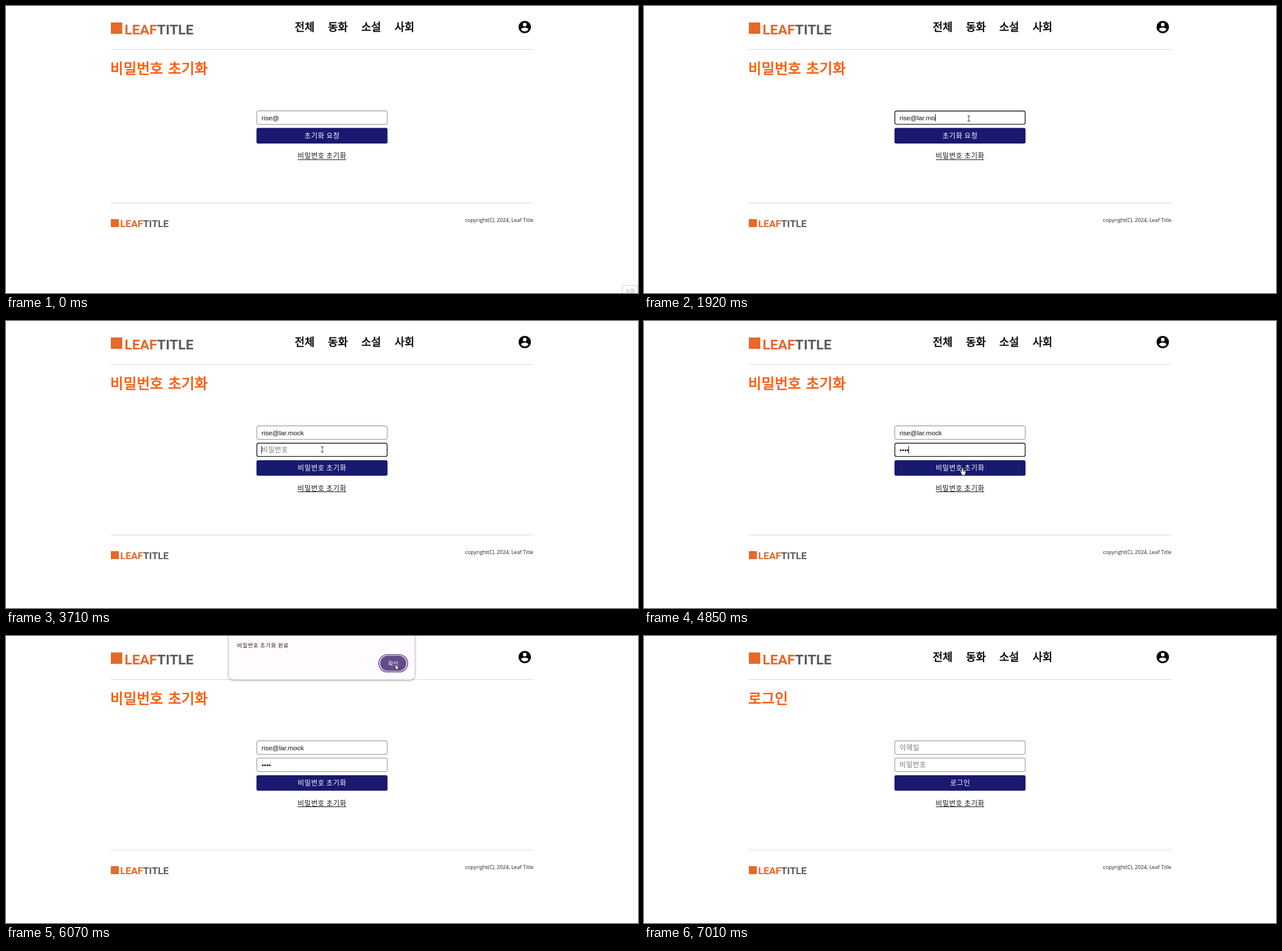
An HTML page with a canvas for the animation above (7.37 s loop, 1109x505 px).

```html
<!DOCTYPE html>
<html lang="ko">
<head>
<meta charset="utf-8">
<title>Leaf Title</title>
<style>
html, body { margin: 0; width: 100%; height: 100%; overflow: hidden; background: #fff; }
canvas { display: block; }
</style>
</head>
<body>
<canvas id="stage" width="1109" height="505"></canvas>
<script>
const ctx = document.getElementById('stage').getContext('2d');
const LOOP = 7370;
const KR = '"Noto Sans CJK KR", "Noto Sans CJK", sans-serif';
const ARIAL = '"Liberation Sans", sans-serif';
const ORANGE = '#e8682a', NAVY = '#191970', PURPLE = '#654b89';
const LEFT = 183.5, RIGHT = 925.5, FORM = 439.5, FORM_W = 230;
const EMAIL = 'rise@lar.mock';
const RESET = '비밀번호 초기화';

// Moments of the story, in ms
const FOCUS_EMAIL = 960, REQUESTED = 3160, FOCUS_PASS = 3710;
const ALERT = 5070, CLOSE = 6110, LOGIN = 6150, FADE = 180;
const DOT_TIMES = [4040, 4300, 4460, 4580];

// Pointer path: time, x, y
const PATH = [
  [60, 1062, 520], [400, 800, 360], [750, 563, 222], [900, 570, 198],
  [2620, 570, 198], [2940, 555, 226], [4600, 555, 226], [4820, 559, 258],
  [5150, 559, 258], [5490, 575, 234], [5760, 676, 47], [6110, 684, 50],
  [6260, 714.5, 80], [6560, 972, 386], [6700, 1025, 450], [7000, 1056, 510]
];

const HAND = new Path2D('M-1.3 1V7L-2.4 6Q-4 5.3-4.1 6.8L-1.8 11V13.2H4.5V11.4Q6 9 5.8 5.5Q5.4 4.1 4.3 4.7Q3.9 3.7 2.8 4.2Q2.3 3.4 1.3 3.8V1Q0-.8-1.3 1Z');
const ARROW = new Path2D('M0 0V10L2.3 7.9L3.8 11.3L5.4 10.6L3.9 7.3H7Z');
const SHOULDERS = new Path2D('M12 19.2c-2.5 0-4.71-1.28-6-3.22 .03-1.99 4-3.08 6-3.08 1.99 0 5.97 1.09 6 3.08-1.29 1.94-3.5 3.22-6 3.22z');
const DIALOG = new Path2D();
DIALOG.roundRect(391, -20, 326, 96.5, 8);
const AROUND_DIALOG = new Path2D(DIALOG);
AROUND_DIALOG.rect(371, -40, 366, 140);

const clamp = v => Math.max(0, Math.min(1, v));

function text(str, x, midY, size, { color = '#111', font = KR, weight = 400, align = 'left', spacing = 0, semibold = false } = {}) {
  ctx.font = `${weight} ${size}px ${font}`;
  ctx.letterSpacing = spacing + 'px';
  ctx.textAlign = align;
  ctx.fillStyle = color;
  const baseline = midY + size * 0.37;
  ctx.fillText(str, x, baseline);
  if (semibold) {
    ctx.strokeStyle = color;
    ctx.lineWidth = size * 0.035;
    ctx.strokeText(str, x, baseline);
  }
  return ctx.measureText(str).width;
}

function box(x, y, w, h, r, fill, stroke, line = 1) {
  ctx.beginPath();
  ctx.roundRect(x, y, w, h, r);
  if (fill) { ctx.fillStyle = fill; ctx.fill(); }
  if (stroke) { ctx.strokeStyle = stroke; ctx.lineWidth = line; ctx.stroke(); }
}

function disc(x, y, r, color) {
  ctx.fillStyle = color;
  ctx.beginPath();
  ctx.arc(x, y, r, 0, Math.PI * 2);
  ctx.fill();
}

function rule(y) {
  ctx.fillStyle = '#d9d9d9';
  ctx.fillRect(LEFT, y, RIGHT - LEFT, 1);
}

function brand(markY, markSize, textX, midY, size) {
  const style = { font: 'Roboto, sans-serif', weight: 700 };
  ctx.fillStyle = ORANGE;
  ctx.fillRect(184, markY, markSize, markSize);
  const w = text('LEAF', textX, midY, size, { ...style, color: ORANGE });
  text('TITLE', textX + w, midY, size, { ...style, color: '#5c5c5c' });
}

function header(title) {
  brand(29, 20, 208, 40.5, 24.5);
  ['전체', '동화', '소설', '사회'].forEach((label, i) =>
    text(label, 506.7 + i * 58.4, 37.5, 18.8, { semibold: true, color: '#000' }));
  disc(910.3, 37, 10.8, '#000');
  disc(910.3, 32.7, 3.2, '#fff');
  ctx.save();
  ctx.translate(897.3, 24);
  ctx.scale(1.08, 1.08);
  ctx.fill(SHOULDERS);
  ctx.restore();
  rule(76);
  ctx.wordSpacing = '3px';
  text(title, 183, 109.5, 25, { semibold: true, color: '#ff5a0a', spacing: 0.2 });
  ctx.wordSpacing = '0px';
}

function field(y, value, hint, focused, caret) {
  if (focused) box(FORM + 0.7, y + 0.7, FORM_W - 1.4, 23.4, 3, '#fff', '#1a1a1a', 1.4);
  else box(FORM + 0.5, y + 0.5, FORM_W - 1, 23.8, 3, '#fff', '#858585');
  const midY = y + 12.6;
  let w = 0;
  if (value) w = text(value, 448.5, midY, 11.7, { font: ARIAL });
  else text(hint, 448.5, midY - 0.3, 12, { color: '#757575', spacing: 0.6 });
  if (caret) {
    ctx.fillStyle = '#111';
    ctx.fillRect(Math.round(448 + w), y + 6, 1, 13);
  }
}

function emailAt(t) {
  if (t < 1200) return EMAIL.slice(0, 5);
  const extra = t < 1400 ? 0 : Math.min(7, 1 + Math.floor((t - 1400) / 120));
  return EMAIL.slice(0, 6 + extra);
}

function form(t, stage) {
  const shift = stage ? 30.3 : 0;
  const login = stage === 2;
  const emailFocus = t >= FOCUS_EMAIL && t < REQUESTED;
  field(184, login ? '' : emailAt(t), '이메일', emailFocus, emailFocus && (t < 2620 || t >= 3120));
  if (stage) {
    const focus = t >= FOCUS_PASS && t < ALERT;
    const dots = login ? 0 : DOT_TIMES.filter(d => t >= d).length;
    field(214.3, '•'.repeat(dots), '비밀번호', focus, focus);
  }
  box(FORM, 214.6 + shift, FORM_W, 27.4, 3, NAVY);
  const center = { align: 'center', spacing: 0.7 };
  text(['초기화 요청', RESET, '로그인'][stage], 554.8, 228.7 + shift, 12, { ...center, color: '#fff' });
  text(RESET, 554.8, 264 + shift, 12, center);
  ctx.fillStyle = '#111';
  ctx.fillRect(512, Math.round(270 + shift), 85, 1);
}

function footer(stage) {
  const dy = stage ? 30 : 0;
  rule(346 + dy);
  brand(375 + dy, 14, 200.5, 382.5 + dy, 17.2);
  text('copyright(C), 2024, Leaf Title', RIGHT, 376.5 + dy, 9.2,
    { font: '"Open Sans", sans-serif', color: '#222', align: 'right' });
}

function dialog(t) {
  if (t < ALERT || t > CLOSE + FADE) return;
  const leaving = clamp((t - CLOSE) / FADE);
  const closing = t >= CLOSE;
  const entering = clamp((t - ALERT) / 120);
  ctx.save();
  ctx.globalAlpha = closing ? 1 - leaving : entering;
  ctx.translate(0, closing ? -13 * leaving : -12 * (1 - entering));
  ctx.fillStyle = '#fffbff';
  // Keep the shadow outside so it does not darken the fading panel
  ctx.save();
  ctx.clip(AROUND_DIALOG, 'evenodd');
  ctx.shadowColor = 'rgba(0,0,0,.45)';
  ctx.shadowBlur = 4;
  ctx.shadowOffsetY = 1;
  ctx.fill(DIALOG);
  ctx.restore();
  ctx.fill(DIALOG);
  text(RESET + ' 완료', 405.5, 16, 9.5, { color: '#1d1b20', spacing: 0.7 });
  if (!closing) box(654.2, 32.7, 50.6, 30.6, 15.3, '#fff', PURPLE, 1.6);
  box(656.5, 34.5, 46, 27, 13.5, PURPLE);
  text('확인', 679.8, 48.3, 9.5, { color: '#fff', align: 'center', spacing: 0.5 });
  ctx.restore();
}

function pointerAt(t) {
  const i = PATH.findIndex(p => p[0] > t);
  if (i < 1) return null;
  const [t0, x0, y0] = PATH[i - 1], [t1, x1, y1] = PATH[i];
  const k = (t - t0) / (t1 - t0);
  return [x0 + (x1 - x0) * k, y0 + (y1 - y0) * k];
}

function pointerKind(t, x, y, stage) {
  if (t >= ALERT) return t < CLOSE && y > 77 ? 'hand' : 'arrow';
  if (x < FORM || x > FORM + FORM_W) return 'arrow';
  const buttonTop = stage ? 245 : 214.6;
  if (y >= buttonTop && y < buttonTop + 27.4) return 'hand';
  return y > 184 && y < buttonTop - 5 ? 'beam' : 'arrow';
}

function pointer(t, stage) {
  const at = pointerAt(t);
  if (!at) return;
  const [x, y] = at;
  const kind = pointerKind(t, x, y, stage);
  ctx.save();
  ctx.translate(x, y);
  ctx.lineWidth = 0.9;
  ctx.strokeStyle = '#222';
  ctx.fillStyle = '#fff';
  if (kind === 'beam') {
    ctx.stroke(new Path2D('M-2.5-4.5H2.5M0-4.5V4.5M-2.5 4.5H2.5'));
  } else {
    const shape = kind === 'hand' ? HAND : ARROW;
    ctx.fill(shape);
    ctx.stroke(shape);
    if (kind === 'hand') ctx.stroke(new Path2D('M1.3 4V7M2.9 4.5V7M4.4 5V7'));
  }
  ctx.restore();
}

function tooltip(t) {
  const alpha = 1 - clamp((t - 20) / 160);
  if (!alpha) return;
  ctx.save();
  ctx.globalAlpha = alpha;
  box(1081.5, 491.5, 26, 20, 0, '#fff', '#d0d0d0');
  text('녹화', 1087, 502, 9.2, { color: '#aaa' });
  ctx.restore();
}

function draw(t) {
  const stage = t < REQUESTED ? 0 : t < LOGIN ? 1 : 2;
  ctx.fillStyle = '#fff';
  ctx.fillRect(0, 0, 1109, 505);
  header(stage === 2 ? '로그인' : RESET);
  form(t, stage);
  footer(stage);
  dialog(t);
  tooltip(t);
  pointer(t, stage);
}

function tick() {
  draw(performance.now() % LOOP);
  requestAnimationFrame(tick);
}
tick();
</script>
</body>
</html>
```
